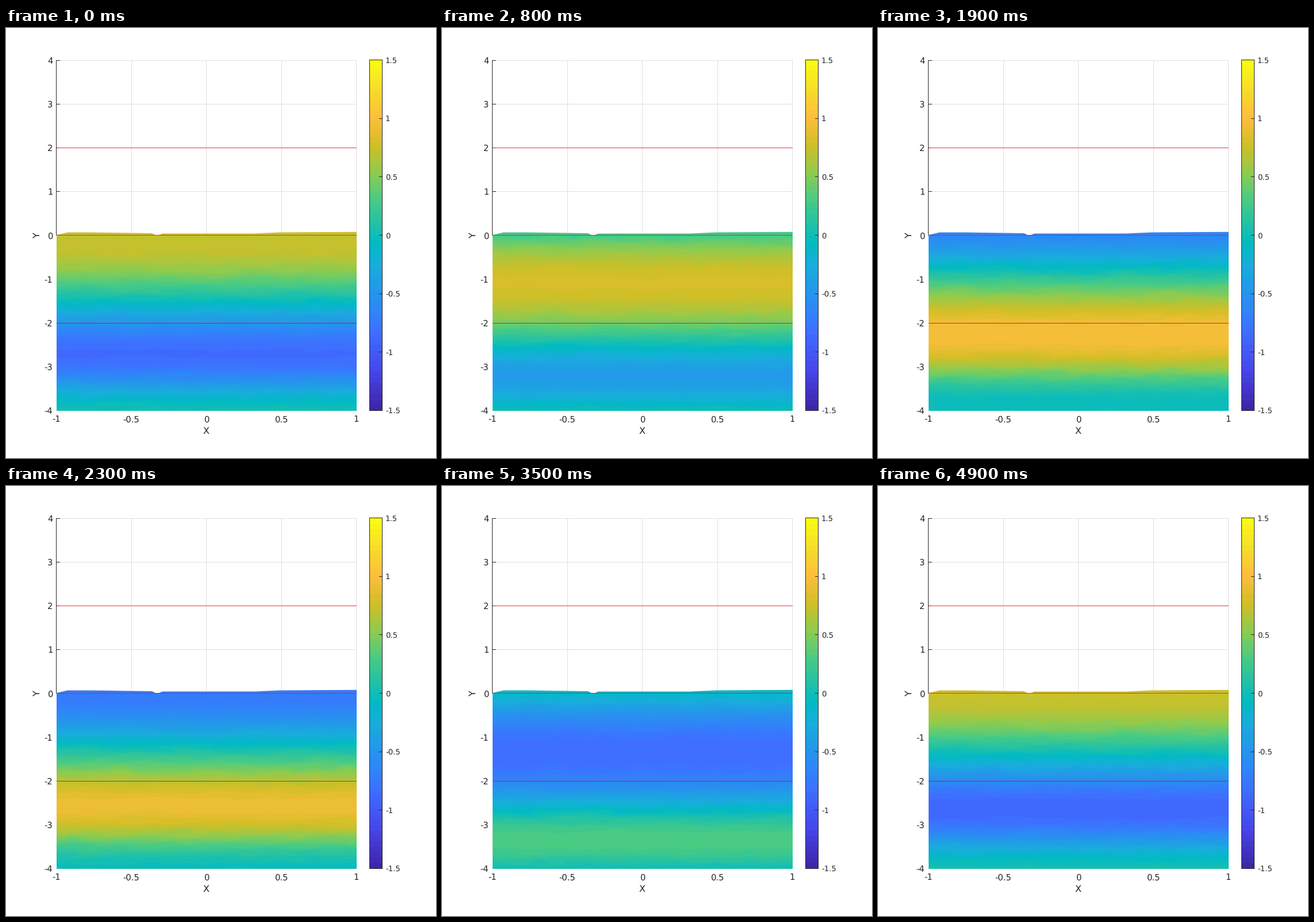
Recreate the animation shown at these times as a matplotlib script. Size 748 by 748 pixels, loop 5000 ms.

```python
import numpy as np
import matplotlib.pyplot as plt
from matplotlib.animation import FuncAnimation
from matplotlib.colors import LinearSegmentedColormap
from matplotlib.patches import Polygon, Rectangle

SIZE, FRAMES, INTERVAL = 748, 50, 100
LEFT, RIGHT, TOP, BOTTOM = 88, 610, 56, 666
BAR_LEFT, BAR_RIGHT = 633, 655
UNIT, SURFACE_TOP = 76.2, 352
DARK, GRID, RED, DEEP_RED = "#262626", "#dfdfdf", "#e6201c", "#b41e1e"

plt.rcParams["font.family"] = "DejaVu Sans"
plt.rcParams["text.hinting"] = "none"

# Blue-green-yellow scale: level out of 63 and its colour
STOPS = [(0, "#3e26a8"), (7, "#4747eb"), (14, "#3e6fff"), (18, "#2e87f7"),
         (26, "#18addb"), (30, "#02bac3"), (38, "#4acb84"), (43, "#8fcb4e"),
         (48, "#d1bf27"), (53, "#febe3d"), (58, "#f7dc2a"), (63, "#f9fb15")]
scale = LinearSegmentedColormap.from_list(
    "scale", [(level / 63, color) for level, color in STOPS], N=64)


def px(x):
    return 348.5 + 261 * x


def py(y):
    return 360.85 - UNIT * y


def wobble(rows, cols, cell_y, cell_x, rng):
    """Smooth random field, bilinear between coarse random knots."""
    ky = np.arange(0, rows + cell_y, cell_y)
    kx = np.arange(0, cols + cell_x, cell_x)
    knots = rng.standard_normal((len(ky), len(kx)))
    wide = np.array([np.interp(np.arange(cols), kx, r) for r in knots])
    return np.array([np.interp(np.arange(rows), ky, c) for c in wide.T]).T


# Depth of every pixel, slightly uneven like a coarse mesh
rng = np.random.default_rng(7)
rows, cols = BOTTOM - SURFACE_TOP, RIGHT - LEFT
depth = (np.arange(rows) + SURFACE_TOP + .5 - py(0))[:, None] / UNIT
depth = np.clip(depth + .03 * wobble(rows, cols, 6, 28, rng), 0, 4)
height = 4 - depth

# A wave sinking from the surface, with a boundary layer at the floor
amplitude = .79 * (1 - np.exp(-.75 * height) * np.cos(1.52 * height))
lag = (.9 * depth - .15 + .1 * np.sin(np.pi * depth / 2.2)
       + .6 * np.exp(-height / .15))


def field(frame):
    return amplitude * np.cos(2 * np.pi * (frame / FRAMES - lag / 5))


fig = plt.figure(figsize=(SIZE / 100, SIZE / 100), dpi=100, facecolor="white")
ax = fig.add_axes([0, 0, 1, 1])


def hline(x0, x1, y, color=DARK, z=2, alpha=1):
    y = np.floor(y) + .5
    ax.plot([x0, x1], [y, y], color=color, lw=.72, zorder=z, alpha=alpha,
            solid_capstyle="butt", snap=False)


def vline(x, y0, y1, color=DARK, z=2):
    x = np.floor(x) + .5
    ax.plot([x, x], [y0, y1], color=color, lw=.72, zorder=z,
            solid_capstyle="butt", snap=False)


def label(x, y, text, size, ha):
    ax.text(x, y + .365 * size, text, fontsize=size * .72, color=DARK,
            ha=ha, va="baseline")


# Grid, left axis and labels
for x in np.arange(-1, 1.1, .5):
    if x > -1:
        vline(px(x), TOP, py(0), GRID, z=1)
    label(px(x), 680, f"{x:g}", 14.7, "center")
for y in range(-4, 5):
    if y > 0:
        hline(LEFT, RIGHT, py(y), GRID, z=1)
        hline(LEFT, LEFT + 6, py(y))
    label(81.5, py(y) + .3, str(y), 14.7, "right")
vline(LEFT - 1, TOP, py(0))
label(px(0), 700, "X", 16.1, "center")
ax.text(59, 361, "Y", fontsize=16.1 * .72, color=DARK, rotation=90,
        rotation_mode="anchor", ha="center", va="baseline")

# Oscillating layer under an uneven surface
surface = [(88, 360), (107, 355.5), (148, 355.5), (254, 357), (260, 360),
           (266, 360), (272, 357.5), (431, 357.5), (476, 355.5), (610, 354.7)]
layer = ax.imshow(field(0), cmap=scale, vmin=-1.5, vmax=1.5, aspect="auto",
                  extent=(LEFT, RIGHT, BOTTOM, SURFACE_TOP),
                  interpolation="nearest", zorder=3)
layer.set_clip_path(Polygon(surface + [(RIGHT, BOTTOM), (LEFT, BOTTOM)],
                            transform=ax.transData))

for y, color in ((2, RED), (0, RED), (-2, DEEP_RED)):
    hline(LEFT, RIGHT, py(y), color, z=4, alpha=.85)

# Colour bar
ax.imshow(np.arange(64)[::-1, None], cmap=scale, aspect="auto",
          extent=(BAR_LEFT, BAR_RIGHT, BOTTOM, TOP),
          interpolation="nearest", zorder=3)
ax.add_patch(Rectangle((BAR_LEFT - .5, TOP - .5), BAR_RIGHT - BAR_LEFT,
                       BOTTOM - TOP, fill=False, ec=DARK, lw=.72, zorder=5,
                       snap=False))
for value in np.arange(-1.5, 1.6, .5):
    y = 360.5 - value * 203.3
    hline(BAR_RIGHT - 6, BAR_RIGHT, y, z=5)
    label(660, y, f"{value:g}", 13.3, "left")

ax.set_xlim(0, SIZE)
ax.set_ylim(SIZE, 0)
ax.axis("off")


def update(frame):
    layer.set_data(field(frame))
    return [layer]


anim = FuncAnimation(fig, update, frames=FRAMES, interval=INTERVAL,
                     repeat=True, repeat_delay=0)
plt.show()
```
